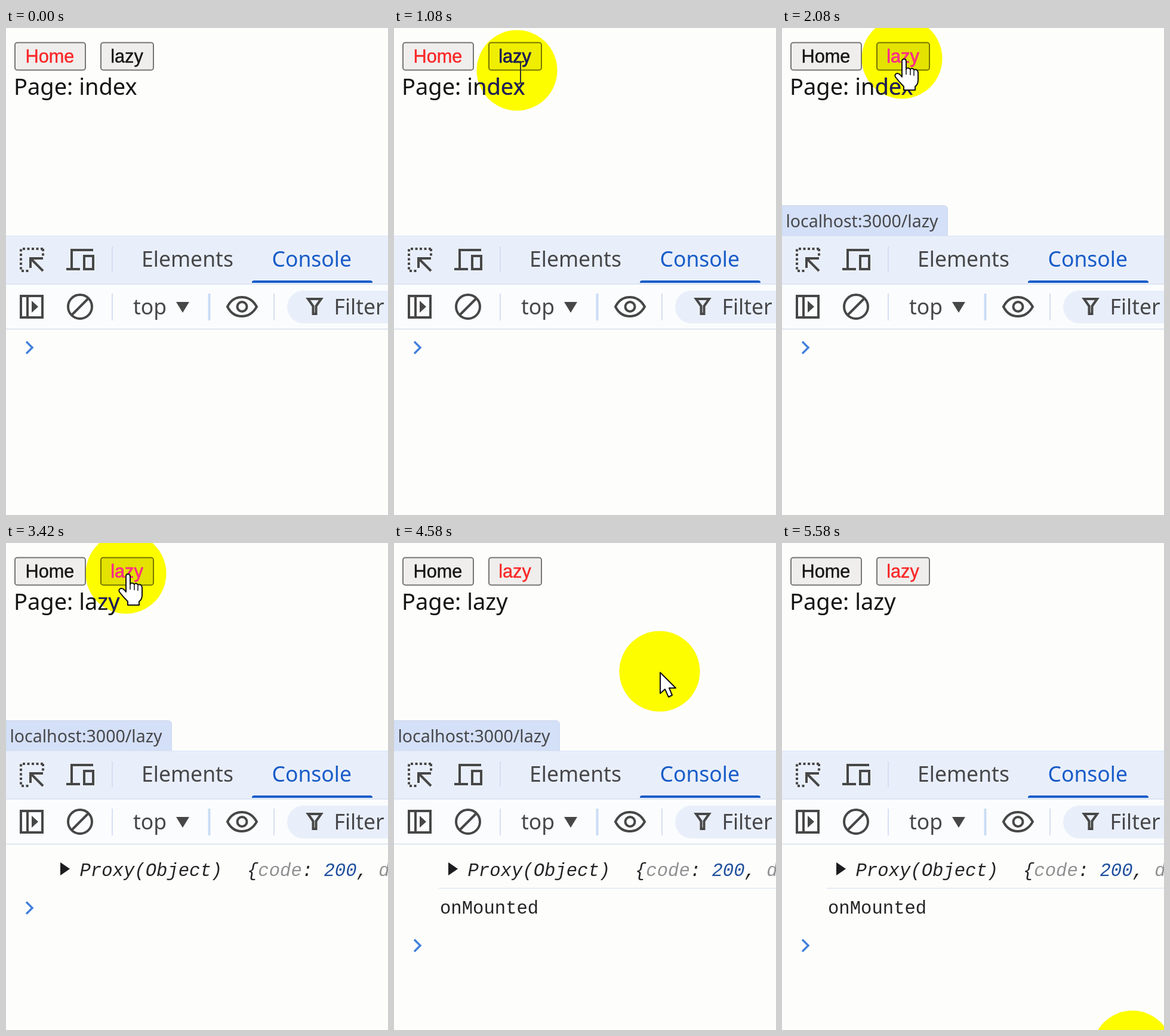
Animation, 640 px wide and 816 px high, one loop 5660 ms. Source, as an HTML page:

```html
<!DOCTYPE html>
<html lang="en">
<head>
<meta charset="utf-8">
<title>Lazy page console</title>
<style>
html, body { margin: 0; width: 100%; height: 100%; overflow: hidden; background: #fdfdfc; }
svg { display: block; width: 640px; height: 816px; --ink: #141414; --hot: #fa2626; }
text { font-family: "Noto Sans", "Open Sans", sans-serif; font-size: 35.5px; fill: #47474a; white-space: pre; }
#words text { fill: var(--ink); }
#words .page { font-size: 38px; }
#words .btn { font: 30.7px "Liberation Sans", Arial, sans-serif; text-anchor: middle; stroke: var(--ink); stroke-width: .4; }
#words .btn.hot { fill: var(--hot); stroke: var(--hot); }
#lens { --ink: #20205c; --hot: #ff2f92; }
.face { fill: #efeeed; stroke: #767676; stroke-width: 2; }
.face.over { fill: #e3e2e1; }
.log text { font: 30.6px "Liberation Mono", "Courier New", monospace; fill: #242426; }
.log .it { font-style: italic; }
.icon { fill: none; stroke: #474747; stroke-width: 4; }
.solid { fill: #474747; }
.rule { stroke: #d5e0f2; stroke-width: 2; }
.cursor { fill: #fff; stroke: #111; stroke-width: 2; stroke-linejoin: round; }
#spot { fill: #ff0; mix-blend-mode: multiply; }
</style>
</head>
<body>
<svg viewBox="0 0 640 816">
  <defs><clipPath id="hole"><circle class="ring" r="67.500"/></clipPath></defs>
  <rect width="640" height="816" fill="#fdfdfc"/>

  <rect class="face" x="15" y="24.500" width="118" height="46" rx="4"/>
  <rect class="face" id="lazyFace" x="159" y="24.500" width="88" height="46" rx="4"/>
  <g id="words">
    <text class="btn" id="home" x="73.500" y="58">Home</text>
    <text class="btn" id="lazy" x="202.500" y="58">lazy</text>
    <text class="page" id="page" x="13" y="111.500">Page: index</text>
  </g>

  <g id="status">
    <path d="M0 297.500H271Q277.500 297.500 277.500 304V349H0Z" fill="#d4e0f7" stroke="#cbd8ee"/>
    <text x="6.500" y="334" style="font-size:28.5px">localhost:3000/lazy</text>
  </g>

  <!-- tab bar -->
  <rect y="348" width="640" height="81" fill="#e9effa"/>
  <path d="M0 348.500H640" stroke="#d8e3f4"/>
  <path d="M0 429H640" stroke="#d6e1f3" stroke-width="1.500"/>
  <path class="icon" d="M62 370H25V407H40M62 370V382" stroke-dasharray="4 3.500"/>
  <path class="icon" d="M62 407L42 387M41 402V386H62" stroke-width="5"/>
  <path class="icon" d="M146 372H110V402M101 404H124M131 382H146V404H131Z"/>
  <path class="rule" d="M178 366V409"/>
  <text x="227" y="400">Elements</text>
  <text x="445.500" y="400" style="fill:#185cc8">Console</text>
  <path d="M412 427V426Q412 423 416 423H610Q614 423 614 426V427Z" fill="#185cc8"/>

  <!-- console toolbar -->
  <rect y="430" width="640" height="74" fill="#fbfcfd"/>
  <path d="M0 504.500H640" stroke="#d6dfec" stroke-width="1.500"/>
  <path class="icon" d="M25 449H61V485H25ZM36 449V485"/>
  <path class="solid" d="M43 457L54 467L43 477Z"/>
  <circle class="icon" cx="124" cy="467" r="20"/>
  <path class="icon" d="M110 481L138 453"/>
  <path class="rule" d="M178 445V490M449 445V490"/>
  <path d="M340.500 445V490" stroke="#cbddf6" stroke-width="4"/>
  <text x="213" y="480">top</text>
  <path class="solid" d="M285 459H307L296 477Z"/>
  <path class="icon" d="M371 467Q379 451 395 451T420 467Q411 483 395 483T371 467Z"/>
  <circle class="icon" cx="395.500" cy="467" r="8"/>
  <rect x="471" y="440" width="220" height="55" rx="27" fill="#e9effa"/>
  <path class="icon" d="M506 454H528L519.500 466V479H514.500V466Z" stroke-width="3.500"/>
  <text x="549.500" y="480">Filter</text>

  <!-- console output -->
  <g class="log" id="proxy">
    <rect id="band" y="525" width="640" height="46" fill="#efefee"/>
    <path d="M91 535L107 546L91 557Z" fill="#1c1c1e"/>
    <text class="it" x="123.500" y="557.500">Proxy(Object)</text>
    <text class="it" x="404" y="557.500">{<tspan fill="#919193">code</tspan>: <tspan fill="#1f4f9c">200</tspan>, <tspan fill="#919193">data</tspan></text>
  </g>
  <g class="log" id="mounted">
    <path d="M75 578.500H640" stroke="#dde5f2" stroke-width="1.500"/>
    <text x="77" y="621">onMounted</text>
  </g>
  <path id="prompt" d="M34 525.500L44 535.500L34 545.500" fill="none" stroke="#4280dc" stroke-width="3.500"/>

  <!-- pointer highlight -->
  <circle class="ring" id="spot" r="67.500"/>
  <g clip-path="url(#hole)"><use href="#words" id="lens"/></g>
  <g id="pointer">
    <path class="cursor" id="arrow" d="M1 2V37L9 30L15 43L21 40L16 28H27Z"/>
    <path id="beam" d="M0-15Q6-15 6-11Q6-15 12-15M6-11V19M0 23Q6 23 6 19Q6 23 12 23" fill="none" stroke="#333" stroke-width="2"/>
    <g id="hand">
      <path class="cursor" d="M0 5Q0 1 3.500 1T7 5V18Q9 14 14 18Q17 15 20 19Q26 17 27 24V36Q27 44 22 47V53H3V47Q-5 39-11 31Q-13 26-8 25Q-4 25 0 31Z"/>
      <path d="M7 17V27M14 18V28M20 20V29" stroke="#111" stroke-width="1.500"/>
    </g>
  </g>
</svg>
<script>
const LOOP = 5660;
const $ = id => document.getElementById(id);
const rings = document.querySelectorAll('.ring');
const shapes = ['arrow', 'beam', 'hand'];

// start time, x, y, pointer shape
const path = [
  [0, 740, 290, 'arrow'], [170, 674, 277, 'arrow'], [250, 667, 275, 'arrow'],
  [500, 560, 255, 'arrow'], [580, 430, 205, 'arrow'], [670, 300, 150, 'arrow'], [750, 261, 140, 'arrow'],
  [920, 236, 112, 'arrow'], [1000, 216, 86, 'beam'], [1080, 206, 71, 'beam'],
  [1170, 204, 61, 'hand'], [1250, 207, 55, 'hand'],
  [1420, 206, 52, 'hand'], [1580, 202, 51, 'hand'], [1750, 201, 51, 'hand'],
  [4250, 257, 77, 'arrow'], [4420, 310, 118, 'arrow'], [4500, 380, 166, 'arrow'],
  [4580, 445, 215, 'arrow'], [4670, 512, 375, 'arrow'], [4750, 570, 560, 'arrow'],
  [4920, 607, 735, 'arrow'], [5000, 607, 785, 'arrow'], [5080, 600, 835, 'arrow'],
  [5170, 590, 875, 'arrow'], [5250, 580, 900, 'arrow'],
  [5420, 570, 875, 'arrow'], [5500, 578, 862, 'arrow'], [5580, 587, 851, 'arrow']
];

const show = (id, on) => $(id).setAttribute('display', on ? 'inline' : 'none');

function draw(t) {
  const [, x, y, shape] = path.findLast(p => p[0] <= t);
  const during = (from, to = LOOP) => t >= from && t < to;
  rings.forEach(r => { r.setAttribute('cx', x); r.setAttribute('cy', y); });
  $('pointer').setAttribute('transform', `translate(${x} ${y})`);
  shapes.forEach(s => show(s, s === shape));

  const clicked = during(1920), loaded = during(3420), mounted = during(3500);
  $('home').classList.toggle('hot', !clicked);
  $('lazy').classList.toggle('hot', clicked);
  $('lazyFace').classList.toggle('over', shape === 'hand');
  $('page').textContent = loaded ? 'Page: lazy' : 'Page: index';
  show('status', during(1420, 4920));
  show('proxy', loaded);
  show('band', during(4750, 5000));
  show('mounted', mounted);
  $('prompt').setAttribute('transform', `translate(0 ${mounted ? 139 : loaded ? 76 : 0})`);
}

const start = performance.now();
function tick() {
  draw((performance.now() - start) % LOOP);
  requestAnimationFrame(tick);
}
tick();
</script>
</body>
</html>
```
